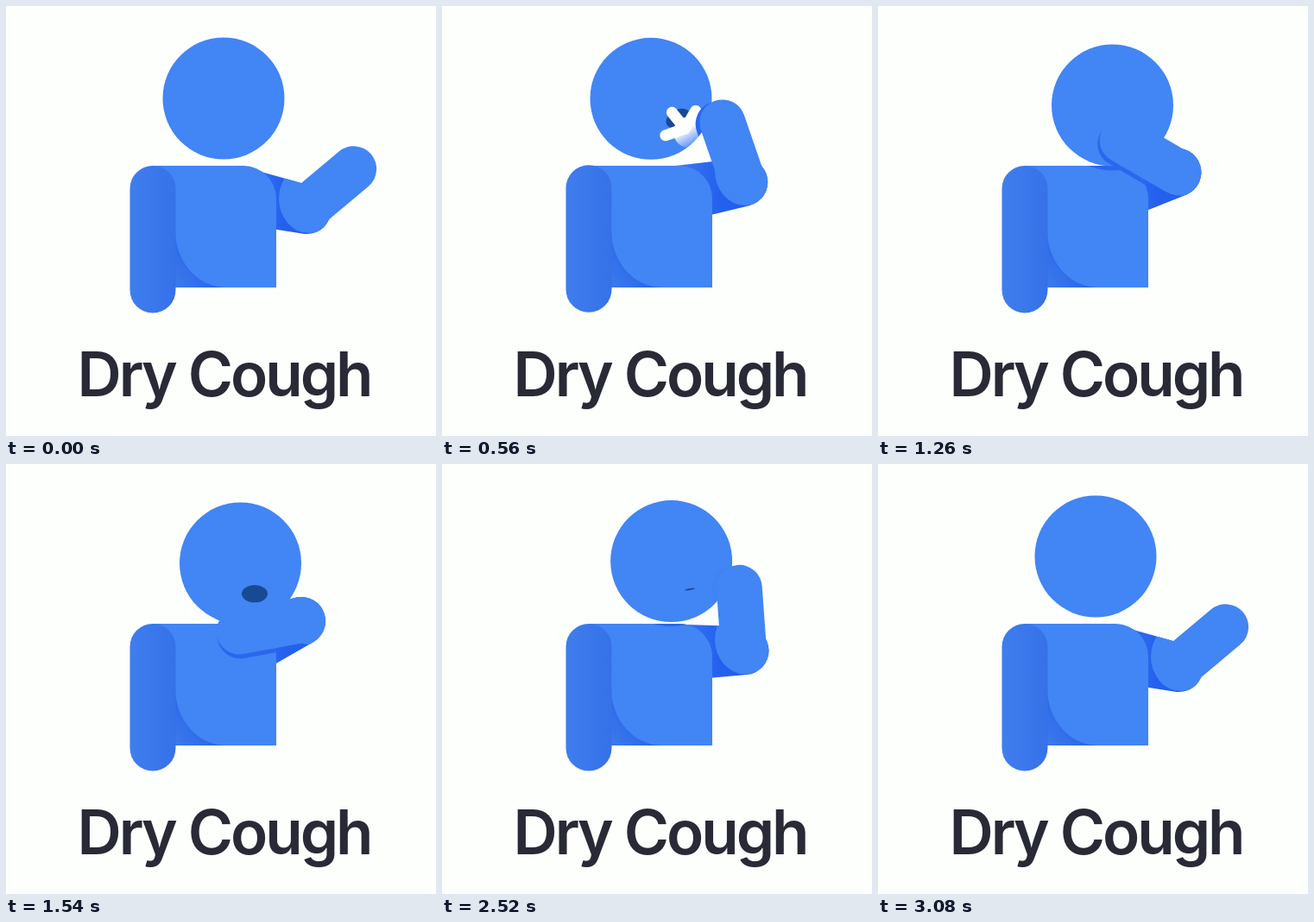
These frames come from a looping animation (498 by 498 pixels, 3.15 s). An HTML page:

```html
<!DOCTYPE html>
<html lang="en">
<head>
<meta charset="utf-8">
<title>Dry Cough</title>
<style>
  html, body { margin: 0; width: 100%; height: 100%; overflow: hidden; background: #fdfffd; }
  svg { display: block; width: 100vw; height: 100vh; }
  text { font: 600 71px Inter, sans-serif; letter-spacing: -3px; fill: #282a35; }
</style>
</head>
<body>
<svg viewBox="0 0 498 498">
  <defs>
    <linearGradient id="sleeve">
      <stop offset="0" stop-color="#3f7eee"/>
      <stop offset="1" stop-color="#3671e8"/>
    </linearGradient>
    <linearGradient id="fold" gradientUnits="userSpaceOnUse" x1="196" y1="320" x2="226" y2="298">
      <stop offset="0" stop-color="#3b79ec"/>
      <stop offset="1" stop-color="#2a66e8"/>
    </linearGradient>
    <linearGradient id="shade" gradientUnits="userSpaceOnUse" x1="275" y1="0" x2="322" y2="0">
      <stop offset="0" stop-color="#3a78f0"/>
      <stop offset="1" stop-color="#2460ee"/>
    </linearGradient>
    <linearGradient id="puff" gradientUnits="userSpaceOnUse" x1="0" y1="0" x2="0" y2="24">
      <stop offset="0" stop-color="#fff"/>
      <stop offset="1" stop-color="#fff" stop-opacity="0"/>
    </linearGradient>
    <path id="torso" d="M170 185H275A38 38 0 0 1 313 223V326H255A59 66 0 0 1 196 260V214H170Z"/>
    <clipPath id="inTorso"><use href="#torso"/></clipPath>
    <clipPath id="inUpper"><path class="upper"/></clipPath>
    <clipPath id="inFigure"><use href="#torso"/><circle class="head" r="70.5"/></clipPath>
  </defs>

  <path class="upper" fill="url(#shade)"/>
  <g clip-path="url(#inUpper)"><ellipse id="elbow" cx="351" rx="35" ry="40" fill="#4285f4"/></g>

  <path d="M190 250H260V326H190Z" fill="url(#fold)"/>
  <use href="#torso" fill="#4285f4"/>
  <g clip-path="url(#inTorso)"><circle id="headShadow" r="70.5" fill="#2b66ee"/></g>
  <rect id="leftArm" x="143.5" width="53" height="170.5" rx="26.5" fill="url(#sleeve)"/>

  <circle class="head" r="70.5" fill="#4285f4"/>
  <ellipse id="mouth" rx="15" ry="10" fill="#174a92"/>
  <g id="burst">
    <circle cx="2" cy="6" r="18" fill="url(#puff)"/>
    <g id="petals" stroke="#fff" stroke-width="13" stroke-linecap="round"></g>
  </g>

  <g clip-path="url(#inFigure)">
    <path id="armShadow" stroke="#2b67ee" stroke-width="53" stroke-linecap="round"/>
  </g>
  <path id="forearm" stroke="#4285f4" stroke-width="53" stroke-linecap="round"/>

  <text x="252.5" y="452" text-anchor="middle">Dry Cough</text>
</svg>
<script>
const LOOP = 3150, STEP = 70, RAD = Math.PI / 180;
const SHOULDER = { x: 268, y: 218.5, r: 33 }, ELBOW_R = 28;
const UPPER_LENGTH = 81.5, FOREARM_LENGTH = 72, MOUTH_RADIUS = 39;

const clamp = u => Math.min(1, Math.max(0, u));
const smooth = u => (u = clamp(u), u * u * (3 - 2 * u));
const easeOut = u => 1 - (1 - clamp(u)) ** 2;

// Angles in degrees; turn is where the mouth sits on the head
const REST = { headX: 252, headY: 107, turn: 36, upper: 12.8, forearm: -40, mouth: 0 };
const { headX, headY, turn, upper, forearm } = REST;
const MOVES = [
  { start: 70, end: 490, to: { headX: 242, headY: 105.5, upper: -9.9, forearm: -109 } },
  { start: 280, end: 490, to: { mouth: 1 } },
  { start: 580, end: 770, to: { headX: 271.5, headY: 115, turn: 65 } },
  { start: 1050, end: 1470, to: { upper: -26.3, forearm: -190.5 } },
  { start: 2240, end: 2590, to: { mouth: 0 } },
  { start: 2240, end: 2940, to: { upper, forearm }, ease: easeOut },
  { start: 2320, end: 2870, to: { headX, headY, turn } }
];
const COUGHS = [490, 1610].flatMap(t => [t, t + 350]);

function poseAt(t) {
  const pose = { ...REST };
  for (const { start, end, to, ease = smooth } of MOVES) {
    const u = ease((t - start) / (end - start));
    for (const key in to) pose[key] += (to[key] - pose[key]) * u;
  }
  return pose;
}

const $ = id => document.getElementById(id);
const set = (el, attrs) => Object.entries(attrs).forEach(([k, v]) => el.setAttribute(k, v));
const setAll = (selector, attrs) => document.querySelectorAll(selector).forEach(el => set(el, attrs));
const polar = (x, y, r, deg) => [x + r * Math.cos(deg * RAD), y + r * Math.sin(deg * RAD)];

// Tapered limb: the shoulder and elbow circles joined by their tangents
function upperArm(ex, ey) {
  const { x, y, r } = SHOULDER;
  const dir = Math.atan2(ey - y, ex - x) / RAD;
  const spread = Math.acos((r - ELBOW_R) / Math.hypot(ex - x, ey - y)) / RAD;
  return `M${polar(x, y, r, dir - spread)}L${polar(ex, ey, ELBOW_R, dir - spread)}`
    + `A${ELBOW_R} ${ELBOW_R} 0 0 1 ${polar(ex, ey, ELBOW_R, dir + spread)}`
    + `L${polar(x, y, r, dir + spread)}Z`;
}

$('petals').innerHTML = [-170, -100, -30].map(a => `<path d="M0 0L${polar(0, 0, 24, a)}"/>`).join('');

function drawHead(pose, t) {
  const since = t - Math.max(-LOOP, ...COUGHS.filter(c => c <= t));
  const jolt = since < 140 ? smooth((since - 30) / 110) : 1 - smooth((since - 140) / 180);
  const cx = pose.headX, cy = pose.headY + 6 * jolt;
  setAll('.head', { cx, cy });
  set($('headShadow'), { cx, cy: cy + 5 });
  set($('leftArm'), { y: 185 - 8 * jolt * jolt });

  const [mx, my] = polar(cx, cy, MOUTH_RADIUS, pose.turn), tilt = pose.turn - 65;
  set($('mouth'), {
    transform: `translate(${mx} ${my}) rotate(${tilt}) scale(${pose.mouth ** .4} ${pose.mouth})`
  });

  const size = since < 70 ? since / 70 : 1 - smooth((since - 70) / 150);
  const [bx, by] = polar(mx, my, 43 * (since / 140) ** 1.6, 56);
  set($('burst'), size > 0
    ? { transform: `translate(${bx} ${by}) rotate(${tilt}) scale(${size})`, visibility: 'visible' }
    : { visibility: 'hidden' });
}

function drawArm(pose) {
  const [ex, ey] = polar(SHOULDER.x, SHOULDER.y - 1.5, UPPER_LENGTH, pose.upper);
  const d = `M${ex} ${ey}L${polar(ex, ey, FOREARM_LENGTH, pose.forearm)}`;
  setAll('.upper', { d: upperArm(ex + 1, ey + 1) });
  set($('elbow'), { cy: ey - 12 });
  set($('forearm'), { d });
  set($('armShadow'), {
    d,
    opacity: smooth((-92 - pose.forearm) / 17),
    transform: `translate(${polar(0, 0, 5, pose.forearm - 90)})`
  });
}

function draw(t) {
  const pose = poseAt(t);
  drawHead(pose, t);
  drawArm(pose);
}

const start = performance.now();
function tick() {
  const t = (performance.now() - start) % LOOP;
  draw(Math.floor(t / STEP) * STEP);
  requestAnimationFrame(tick);
}
tick();
</script>
</body>
</html>
```
